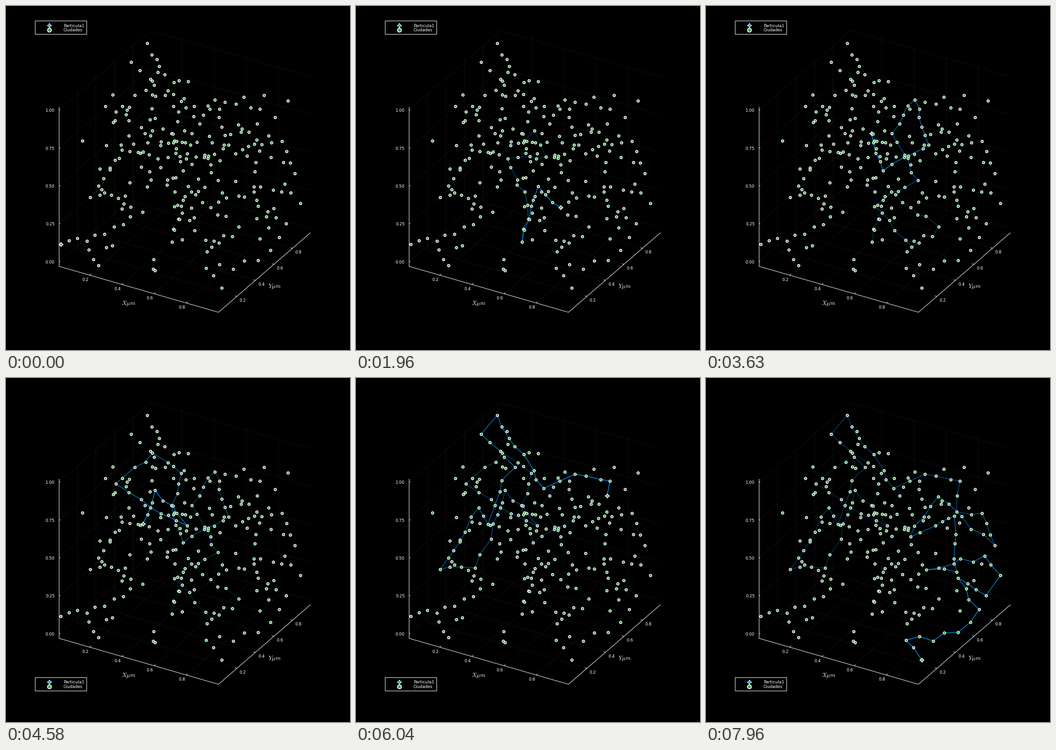
A matplotlib script that plays this animation: 748 px wide and 748 px high, repeating every 8 s.

```python
import numpy as np
import matplotlib.pyplot as plt
from matplotlib.animation import FuncAnimation
from matplotlib.collections import LineCollection
from matplotlib.patches import Rectangle

SIZE, DPI = 748, 88
PX = 72 / DPI                       # points per pixel
STEPS, LOOP = 192, 8000
BLUE, GREEN = (0, 0.605, 0.979), (0.24, 0.64, 0.30)
plt.rcParams.update({"font.family": "DejaVu Sans", "mathtext.fontset": "cm"})

# Corners of the particle's walk; the cities between them are filled in.
WALK = np.array([
    (119, 518), (214, 496), (297, 448), (208, 399), (252, 313), (311, 323),
    (388, 271), (413, 328), (330, 332), (373, 433), (361, 513), (396, 392),
    (445, 438), (506, 480), (447, 524), (366, 436), (461, 379), (404, 277),
    (454, 204), (484, 302), (385, 358), (360, 277), (381, 207), (318, 163),
    (239, 230), (394, 321), (324, 244), (294, 350), (259, 413), (183, 416),
    (267, 282), (287, 318), (346, 194), (272, 122), (307, 81), (408, 240),
    (476, 209), (552, 224), (545, 291), (600, 294), (628, 364), (505, 258),
    (445, 345), (540, 300), (545, 422), (479, 417), (606, 387), (640, 429),
    (609, 473), (548, 435), (594, 503), (548, 553), (435, 570), (469, 613)])
# Corner index -> step at which it is reached.
ANCHORS = {0: 0, 5: 21, 12: 47, 21: 87, 27: 110, 38: 145, 53: 191}

# Box edges in pixels: corner of the floor, and the three axis directions.
CORNER = np.array([115, 566])
XDIR, YDIR, ZDIR = np.array([347, 100]), np.array([200, -173]), np.array([0, -347])


def spot(x, y, z):
    return CORNER + x * XDIR + y * YDIR + z * ZDIR


def walk_cities():
    """City visited at each step, spaced evenly along the walk."""
    dist = np.r_[0, np.cumsum(np.hypot(*np.diff(WALK, axis=0).T))]
    idx = list(ANCHORS)
    when = np.round(np.interp(dist, dist[idx], list(ANCHORS.values())))
    step = np.arange(STEPS)
    pos = np.column_stack([np.interp(step, when, c) for c in WALK.T])
    wobble = np.random.default_rng(7).normal(0, 4.5, pos.shape)
    wobble[when.astype(int)] = 0
    return pos + wobble


def lone_cities(path, count):
    """Random cities in the box that keep clear of the walk."""
    rng = np.random.default_rng(12)
    found = []
    while len(found) < count:
        p = spot(*rng.uniform(0.02, 0.97, 3))
        if np.hypot(*(path - p).T).min() > 11:
            found.append(p)
    return np.array(found)


fig = plt.figure(figsize=(SIZE / DPI, SIZE / DPI), dpi=DPI, facecolor="black")
ax = fig.add_axes([0, 0, 1, 1])
ax.set(xlim=(0, SIZE), ylim=(SIZE, 0))
ax.axis("off")


def draw_lines(lines, width, alpha):
    ax.add_collection(LineCollection(lines, colors=[(1, 1, 1, alpha)],
                                     linewidths=width * PX, zorder=1))


def label(x, y, text, size=9, **kw):
    kw = {"va": "center_baseline", "color": "white", "zorder": 8, **kw}
    return ax.text(x, y, text, fontsize=size * PX, **kw)


def draw_axes():
    grid, edges = [], [[spot(0, 0, 1), spot(0, 0, 0)],
                       [spot(0, 0, 0), spot(1, 0, 0)],
                       [spot(1, 0, 0), spot(1, 1, 0)]]
    for i in range(4):
        name = f"{0.2 * (i + 1):.1f}"
        u, v = (67 + 70 * i) / 347, (40 + 40.3 * i) / 200
        grid += [[spot(u, 0, 0), spot(u, 1, 0)], [spot(u, 1, 0), spot(u, 1, 1)],
                 [spot(0, v, 0), spot(1, v, 0)], [spot(0, v, 0), spot(0, v, 1)]]
        px, py = spot(u, 0, 0), spot(1, v, 0)
        edges += [[px, px + (3, -2.6)], [py, py + (-4, -1.2)]]
        label(px[0] - 9, px[1] + 9, name, ha="center")
        label(py[0] + 13, py[1] + 8, name, ha="center")
    for i in range(5):
        w = (10 + 82.3 * i) / 347
        grid += [[spot(0, 0, w), spot(0, 1, w)], [spot(0, 1, w), spot(1, 1, w)]]
        p = spot(0, 0, w)
        edges.append([p, p + (3, -1)])
        label(106, p[1], f"{0.25 * i:.2f}", ha="right")
    draw_lines(grid, 0.6, 0.1)
    draw_lines(edges, 1, 1)
    label(251, 650, r"$X\mu m$", 12.7, va="baseline")
    label(570, 613, r"$Y\mu m$", 12.7, va="baseline")


def markers(xy, shape, size, edge, fill, z):
    x, y = np.atleast_2d(xy).T
    return ax.plot(x, y, ls="", marker=shape, ms=size * PX, mew=edge * PX,
                   mfc=fill, mec="white", zorder=z)[0]


def draw_legend(y):
    box = ax.add_patch(Rectangle((63, y), 112.5, 29, fc="black", ec="white",
                                 lw=PX, zorder=6))
    return [box,
            markers((94, y + 9.7), (4, 1, 0), 10, 1.1, BLUE, 7),
            markers((94, y + 19.5), "o", 8.4, 1.8, GREEN, 7),
            label(125, y + 10, "Particula1"),
            label(125, y + 19.7, "Ciudades")]


draw_axes()
path = walk_cities()
trail = LineCollection(np.stack([path[:-1], path[1:]], axis=1),
                       linewidths=1.4 * PX, zorder=2)
ax.add_collection(trail)
head = markers(path[0], (4, 1, 0), 10, 1.1, BLUE, 3)
markers(np.vstack([lone_cities(path, 60), path]), "o", 5.6, 1.4, GREEN, 4)
top, bottom = draw_legend(32), draw_legend(651)

tint = np.zeros((STEPS - 1, 4))
tint[:, :3] = BLUE
order = np.arange(1, STEPS)


def update(n):
    tint[:, 3] = np.where(order <= n, (order / max(n, 1)) ** 2, 0).clip(0, 1)
    trail.set_color(tint.copy())
    head.set_data([path[n, 0]], [path[n, 1]])
    low = 103 <= n < 122 or n >= 135
    for group, shown in ((top, not low), (bottom, low)):
        for artist in group:
            artist.set_visible(shown)
    return [trail, head, *top, *bottom]


anim = FuncAnimation(fig, update, frames=STEPS, interval=LOOP / STEPS,
                     init_func=lambda: update(0), repeat=True, repeat_delay=0)
plt.show()
```
